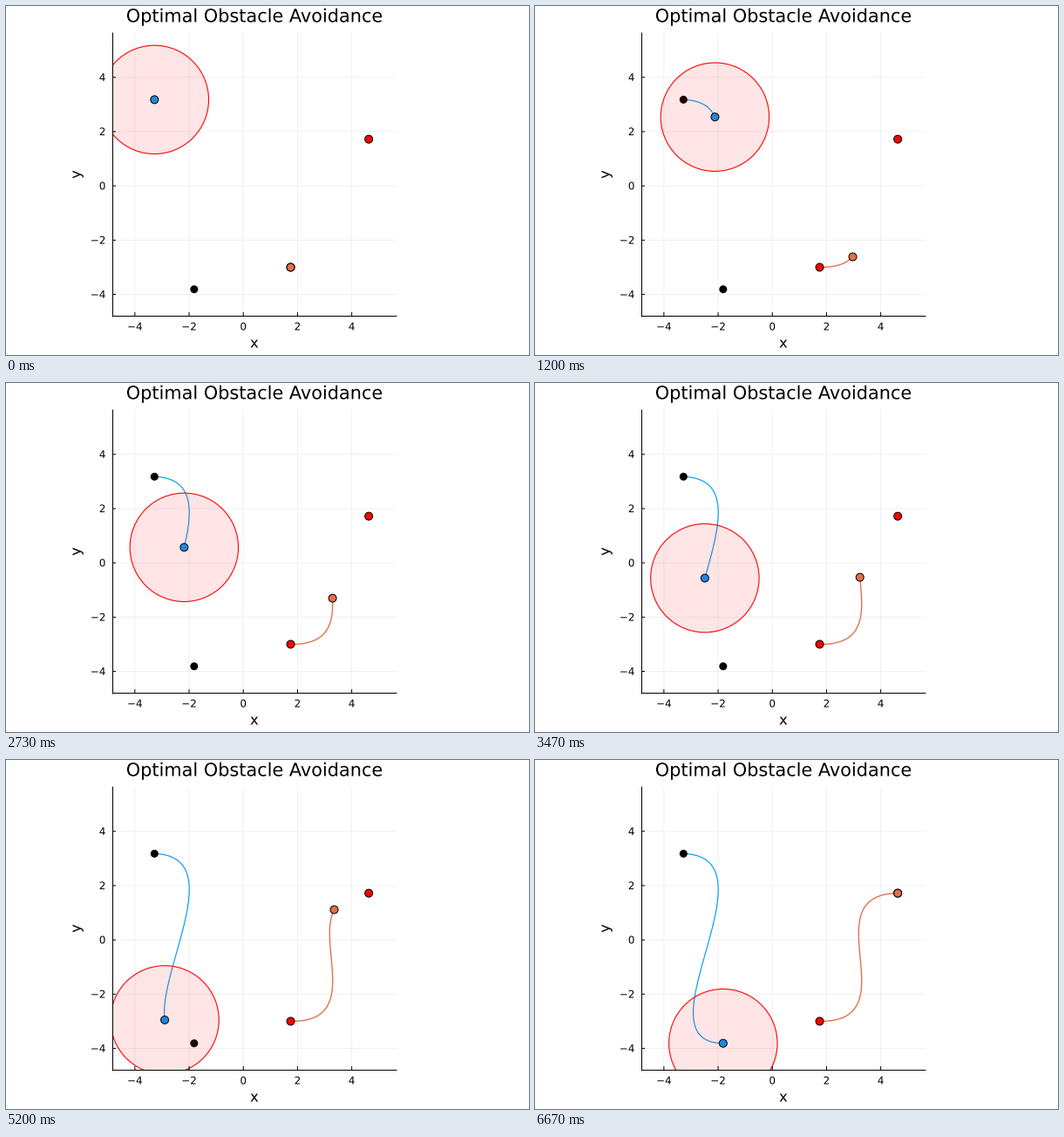
These frames come from a looping animation (600 by 400 pixels, 6.74 s). A matplotlib script:

```python
import numpy as np
import matplotlib.pyplot as plt
from matplotlib.animation import FuncAnimation
from matplotlib.patches import Circle, PathPatch, Rectangle
from matplotlib.textpath import TextPath
from matplotlib.transforms import Affine2D

W, H, DPI = 600, 400, 100
STEPS = 100
STEP_MS = 1000 / 15
LOOP_MS, TICK_MS = 6740, 20
UNIT = 31.1                      # pixels per data unit
ORIGIN = np.array([272.25, 206.15])
LEFT, RIGHT, TOP, BOTTOM = 122, 448, 30, 355
BLUE, ORANGE, RED = "#009afa", "#e36f47", "#ff0000"


def pt(px):
    return px * 72 / DPI


def to_px(p):
    return ORIGIN + np.asarray(p) * [UNIT, -UNIT]


def hermite(p0, v0, p1, v1):
    """Minimum-energy path between two states, sampled at every step."""
    s = np.linspace(0, 1, STEPS + 1)[:, None]
    p0, v0, p1, v1 = map(np.array, (p0, v0, p1, v1))
    blend = s * s * (3 - 2 * s)
    path = p0 + (p1 - p0) * blend + v0 * s * (1 - s) ** 2 - v1 * s * s * (1 - s)
    return to_px(path)


blue_path = hermite((-3.277, 3.177), (10.7, -0.35), (-1.814, -3.812), (9.77, -0.06))
orange_path = hermite((1.746, -3.0), (10.19, -0.13), (4.627, 1.72), (9.73, 0.13))

plt.rcParams["font.family"] = "DejaVu Sans"
fig = plt.figure(figsize=(W / DPI, H / DPI), dpi=DPI, facecolor="white")
ax = fig.add_axes([0, 0, 1, 1])
ax.set_xlim(0, W)
ax.set_ylim(H, 0)
ax.axis("off")


def line(xs, ys, z, **kw):
    return ax.plot(xs, ys, zorder=z, solid_capstyle="butt", **kw)[0]


def advance(text, px):
    def end(s):
        return TextPath((0, 0), s, size=px).get_extents().x1
    return end(text + "|") - end("|")


def label(x, y, text, px, align=0.5, turn=0):
    """Outlined text with its baseline through (x, y)."""
    place = Affine2D().translate(-align * advance(text, px), 0)
    place.scale(1, -1).rotate_deg(-turn).translate(x, y)
    glyphs = TextPath((0, 0), text, size=px).transformed(place)
    ax.add_patch(PathPatch(glyphs, fc="black", lw=0, zorder=8))


def dot(pos, face, z, edge=1.0):
    return ax.add_patch(Circle(pos, 4.5, fc=face, ec="black", lw=pt(edge), zorder=z))


# Grid, ticks and tick labels
for v in range(-4, 5, 2):
    x, y = to_px((v, v))
    name = str(v).replace("-", "\u2212")
    grid = dict(color="black", alpha=0.06, lw=pt(1), snap=False)
    tick = dict(color="black", lw=pt(1), snap=False)
    line([x, x], [TOP, BOTTOM], 1, **grid)
    line([LEFT, RIGHT], [y, y], 1, **grid)
    line([x, x], [BOTTOM, BOTTOM - 4], 8, **tick)
    line([LEFT, LEFT + 4], [y, y], 8, **tick)
    label(x, 371.5, name, 11.9)
    label(114.4, y - 0.1 + 4.3, name, 11.9, align=1)

line([LEFT, LEFT], [TOP, BOTTOM + 1], 8, color="black", lw=pt(1))
line([LEFT, RIGHT], [BOTTOM, BOTTOM], 8, color="black", lw=pt(1))

label(285, 18.4, "Optimal Obstacle Avoidance", 20.83)
label(284.9, 391.5, "x", 16.37)
label(85.4, 193.1, "y", 16.37, turn=90)

# Start and goal points
dot(blue_path[0], "black", 4, edge=0)
dot(blue_path[-1], "black", 4, edge=0)
dot(orange_path[0], RED, 4)
dot(orange_path[-1], RED, 4)

# Moving parts
blue_trail = line([], [], 3, color=BLUE, lw=pt(1.15))
orange_trail = line([], [], 3, color=ORANGE, lw=pt(1.35))
blue_dot = dot(blue_path[0], BLUE, 5)
orange_dot = dot(orange_path[0], ORANGE, 5)
zone = Circle(blue_path[0], 2 * UNIT, fc=(1, 0, 0, 0.1), ec=RED, lw=pt(1.1), zorder=6)
ax.add_patch(zone)
zone.set_clip_path(Rectangle((LEFT, TOP), RIGHT - LEFT, BOTTOM + 1 - TOP,
                             transform=ax.transData))


def update(i):
    # Step shown at the middle of this tick, with step times rounded to 10 ms
    k = min(STEPS, int(((i + 0.5) * TICK_MS + 5) / STEP_MS))
    for path, trail, marker in ((blue_path, blue_trail, blue_dot),
                                (orange_path, orange_trail, orange_dot)):
        trail.set_data(path[:k + 1, 0], path[:k + 1, 1])
        marker.center = tuple(path[k])
    zone.center = tuple(blue_path[k])
    return blue_trail, orange_trail, blue_dot, orange_dot, zone


anim = FuncAnimation(fig, update, frames=LOOP_MS // TICK_MS, interval=TICK_MS,
                     repeat=True, repeat_delay=0, blit=False)
plt.show()
```
